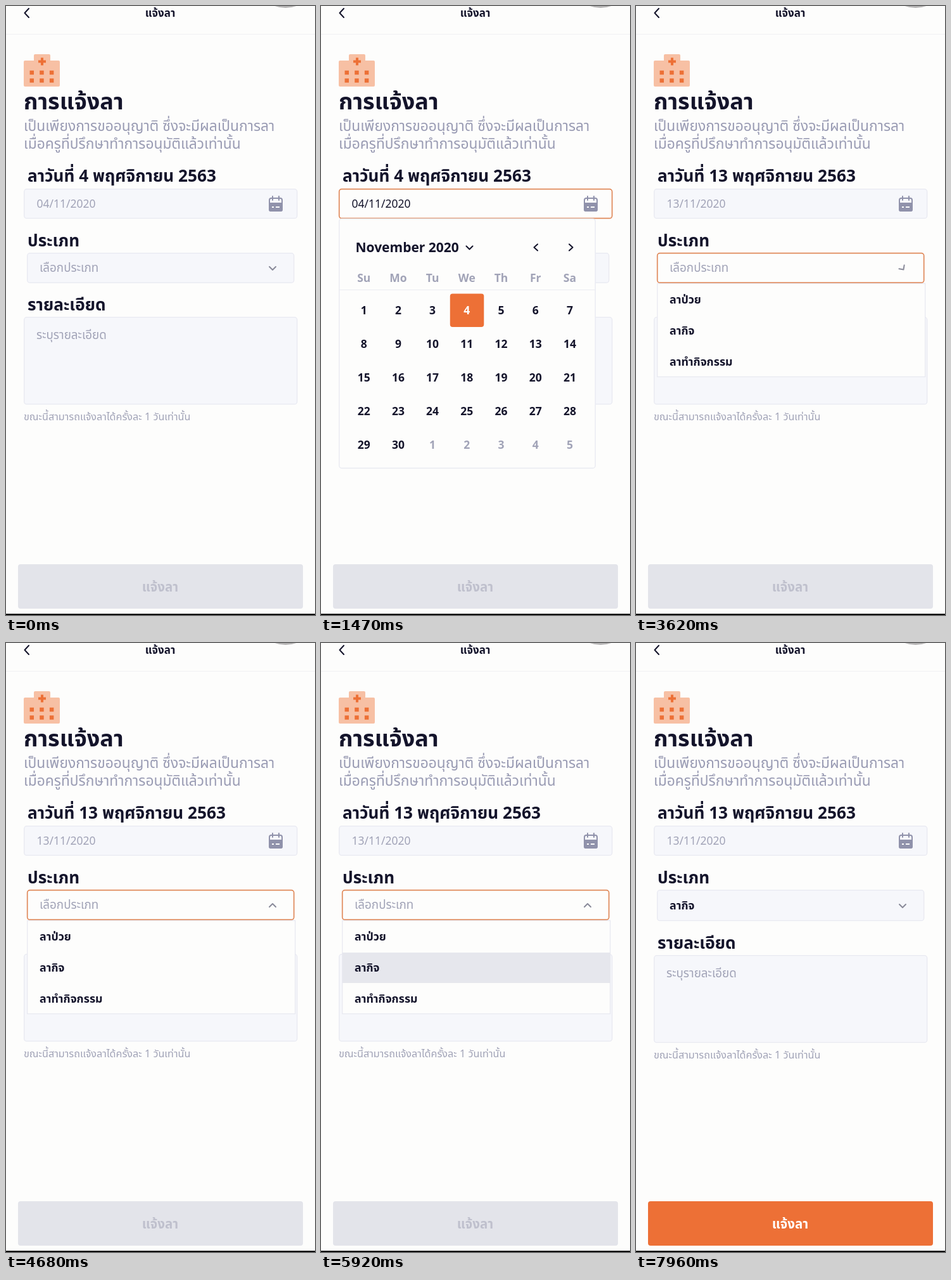
Recreate the animation shown at these times as an HTML page. Size 488 by 960 pixels, loop 8 s.

```html
<!DOCTYPE html>
<html lang="th">
<head>
<meta charset="utf-8">
<style>
  :root { --page: #fdfdfc; --field: #f6f7fb; --line: #e8e9f1; --ink: #14142b; --accent: #ed7036; --edge: #e0895a; --muted: #a1a3b7; }
  html, body { margin: 0; width: 100%; height: 100%; overflow: hidden; background: var(--page); }
  svg { display: block; width: 488px; height: 960px; }
  text { font: 17.5px "Noto Sans", "Noto Sans Thai", sans-serif; fill: var(--ink); white-space: pre; }
  .title { font-size: 36px; font-weight: 600; }
  .label { font-size: 26.2px; font-weight: 600; }
  .sub { font-size: 22.8px; fill: #9a9cb4; }
  .hint { fill: var(--muted); }
  .thai { font-size: 18.8px; }
  .small { font-size: 16.2px; }
  .bold { font-weight: 600; }
  .option { font-size: 17.8px; font-weight: 600; }
  .mid { text-anchor: middle; }
  .box { fill: var(--field); stroke: var(--line); stroke-width: 1.3; }
  .box.active { fill: var(--page); stroke: var(--edge); stroke-width: 1.7; }
  .panel { fill: var(--page); stroke: var(--line); stroke-width: 1.3; }
  .stroke { fill: none; stroke: var(--ink); stroke-width: 2; stroke-linecap: round; stroke-linejoin: round; }
  .day rect { fill: none; }
  .day.picked rect { fill: var(--accent); }
  .day.picked text { fill: #fff; }
  .day.today rect { fill: #f1f1f3; stroke: var(--edge); stroke-width: 1.6; }
</style>
</head>
<body>
<svg viewBox="0 0 488 960">
  <circle cx="441.5" cy="-47" r="50" fill="#b5b4b4"/>
  <path class="stroke" d="M36 4L29.500 11L36 18"/>
  <text class="mid bold" x="243.500" y="17" style="font-size:17px">แจ้งลา</text>
  <path d="M0 44.500H488" stroke="#f0f0f3"/>

  <path fill="#f7c0a4" d="M30 86H44V78Q44 76 46 76H68Q70 76 70 78V86H83Q85 86 85 88V125Q85 127 83 127H30Q28 127 28 125V88Q28 86 30 86Z"/>
  <g stroke="var(--accent)">
    <path stroke-width="4" d="M51 87.500H63M57 81.500V93.500"/>
    <path stroke-width="6.500" stroke-dasharray="6.500 9.200" d="M37.500 105H77M37.500 117.500H77"/>
  </g>

  <text class="title" x="28" y="163">การแจ้งลา</text>
  <text class="sub" x="28" y="197">เป็นเพียงการขออนุญาติ ซึ่งจะมีผลเป็นการลา</text>
  <text class="sub" x="28" y="225">เมื่อครูที่ปรึกษาทำการอนุมัติแล้วเท่านั้น</text>

  <text class="label" x="34" y="277" id="dateLabel"></text>
  <rect class="box" id="dateBox" x="28.700" y="288.700" width="431" height="46" rx="4"/>
  <text x="48.500" y="318" id="dateText"></text>
  <g stroke="#9092ab" fill="none" stroke-width="2">
    <rect x="416" y="303" width="20" height="20" rx="3"/>
    <path d="M421 300V306M431 300V306" stroke-linecap="round"/>
    <path d="M416 311H436V321Q436 323 434 323H418Q416 323 416 321Z" fill="#9092ab"/>
    <path d="M420 317H423M426 317H432" stroke="#fdfdfc"/>
  </g>

  <text class="label" x="34" y="379">ประเภท</text>
  <rect class="box" id="typeBox" x="33.700" y="389.700" width="421" rx="4"/>
  <text x="53" id="typeText"></text>
  <path class="stroke" id="arrow" d="M-5 -2.500L0 2.500L5 -2.500" style="stroke:#8a8b9a"/>

  <g id="details">
    <text class="label" x="34" y="480">รายละเอียด</text>
    <rect class="box" x="28.700" y="490.700" width="431" height="137" rx="4"/>
    <text class="hint thai" x="48" y="525">ระบุรายละเอียด</text>
    <text class="hint small" x="28" y="653">ขณะนี้สามารถแจ้งลาได้ครั้งละ 1 วันเท่านั้น</text>
  </g>

  <g id="menu">
    <rect class="panel" x="33.700" y="437.500" width="423" height="147"/>
    <rect id="hover" x="34" y="488" width="423" height="48" fill="#e6e7ed"/>
    <text class="option" x="53" y="469">ลาป่วย</text>
    <text class="option" x="53" y="518">ลากิจ</text>
    <text class="option" x="53" y="567">ลาทำกิจกรรม</text>
  </g>

  <g id="calendar">
    <rect class="panel" x="28.700" y="335.500" width="404.500" height="393" rx="4"/>
    <text class="bold" x="54.500" y="388" style="font-size:21px">November 2020</text>
    <path class="stroke" d="M229.500 378.500L234.500 383.500L239.500 378.500M342 375.500L336.500 380.500L342 385.500M392 375.500L397.500 380.500L392 385.500"/>
    <path d="M29 447.500H433" stroke="#ebecf2"/>
    <g id="days"></g>
  </g>

  <rect id="button" x="19" y="880" width="450" height="70" rx="4"/>
  <text class="mid bold" id="buttonText" x="243.500" y="923" style="font-size:20.5px">แจ้งลา</text>
  <rect y="958" width="488" height="2"/>
</svg>
<script>
const LOOP = 8000;
const time = { calendarOpen: 850, datePick: 2100, calendarClose: 3150, menuOpen: 3550, hover: 5000, typePick: 6000 };
const el = id => document.getElementById(id);
const show = (id, on) => { el(id).style.display = on ? '' : 'none'; };

const columnX = i => 67.7 + 54.2 * i;
let cells = ['Su', 'Mo', 'Tu', 'We', 'Th', 'Fr', 'Sa'].map((name, i) =>
  `<text class="mid bold hint" x="${columnX(i)}" y="435">${name}</text>`).join('');
for (let i = 0; i < 35; i++) {
  const x = columnX(i % 7), y = 480 + 53 * Math.floor(i / 7);
  const next = i >= 30;
  cells += `<g class="day" id="day${i + 1}">
    <rect x="${x - 26.5}" y="${y - 26.5}" width="53.500" height="52.500" rx="4"/>
    <text class="mid bold ${next ? 'hint' : ''}" x="${x}" y="${y + 6}">${next ? i - 29 : i + 1}</text></g>`;
}
el('days').innerHTML = cells;

function render(t) {
  const calendar = t >= time.calendarOpen && t < time.calendarClose;
  const picked = t >= time.datePick;
  const menu = t >= time.menuOpen && t < time.typePick;
  const done = t >= time.typePick;

  el('dateLabel').textContent = `ลาวันที่ ${picked ? 13 : 4} พฤศจิกายน 2563`;
  el('dateText').textContent = `${picked ? '13' : '04'}/11/2020`;
  el('dateText').setAttribute('class', calendar ? '' : 'hint');
  el('dateBox').classList.toggle('active', calendar);
  show('calendar', calendar);
  el('day4').setAttribute('class', picked ? 'day today' : 'day picked');
  el('day13').setAttribute('class', picked ? 'day picked' : 'day');

  show('menu', menu);
  show('hover', t >= time.hover);
  el('typeBox').classList.toggle('active', menu);
  el('typeBox').setAttribute('height', done ? 48 : 46.5);
  el('typeText').textContent = done ? 'ลากิจ' : 'เลือกประเภท';
  el('typeText').setAttribute('class', done ? 'option' : 'hint thai');
  el('typeText').setAttribute('y', done ? 420 : 419);

  const ramp = start => Math.min(1, Math.max(0, (t - start) / 250));
  const ease = p => p * p * (3 - 2 * p);
  const turn = ease(ramp(time.menuOpen)) - ease(ramp(time.typePick));
  el('arrow').setAttribute('transform', `translate(421 ${done ? 414.5 : 413.5}) rotate(${-180 * turn})`);

  el('details').setAttribute('transform', `translate(0 ${done ? 2 : 0})`);
  el('button').style.fill = done ? 'var(--accent)' : '#e3e4ea';
  el('buttonText').style.fill = done ? '#fff' : '#bfc0cd';
}

function frame() {
  render(performance.now() % LOOP);
  requestAnimationFrame(frame);
}
frame();
</script>
</body>
</html>
```
